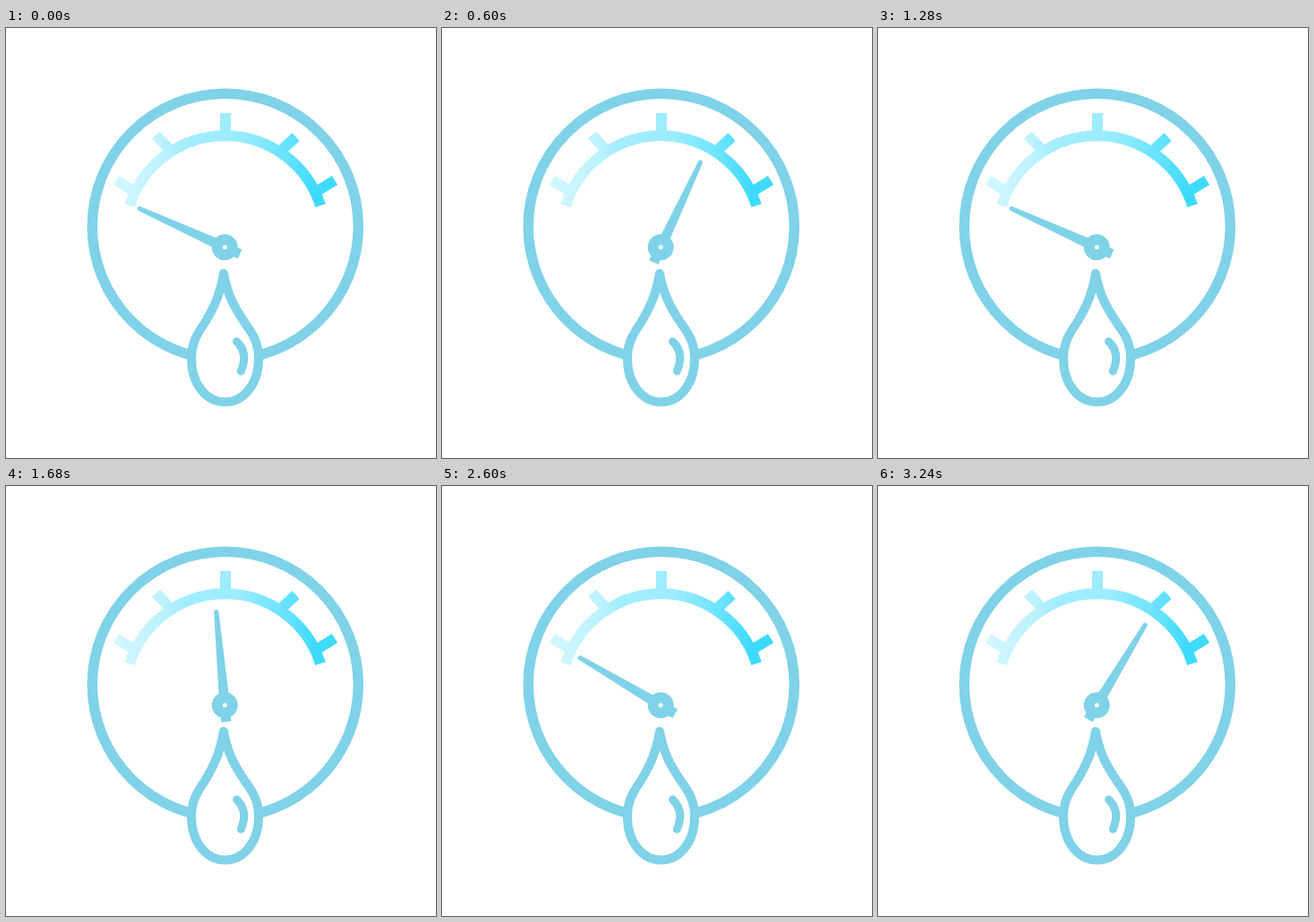
Recreate the animation shown at these times as an HTML page. Size 480 by 480 pixels, loop 3520 ms.

```html
<!DOCTYPE html>
<html lang="en">
<head>
<meta charset="utf-8">
<title>Water gauge</title>
<style>
  html, body { margin: 0; width: 100%; height: 100%; overflow: hidden; background: #fff; }
  svg { display: block; width: 100%; height: 100%; }
</style>
</head>
<body>
<svg viewBox="0 0 480 480" fill="none" stroke="#7fd2e8">
  <defs>
    <linearGradient id="scale" gradientUnits="userSpaceOnUse" x1="120" y1="0" x2="370" y2="0">
      <stop offset="0" stop-color="#d4f7ff"/>
      <stop offset=".22" stop-color="#bcf2ff"/>
      <stop offset=".32" stop-color="#a2edff"/>
      <stop offset=".56" stop-color="#9cecff"/>
      <stop offset=".78" stop-color="#66e2ff"/>
      <stop offset=".9" stop-color="#3edafd"/>
      <stop offset="1" stop-color="#3edafd"/>
    </linearGradient>
  </defs>
  <circle cx="244.8" cy="221.7" r="148.5" stroke-width="11.5"/>
  <path stroke="url(#scale)" stroke-width="12"
    d="M138 198.3A111.7 111.7 0 0 1 351 198.3M123 170L141 181M167.5 119.5L181 134M245 95V119M323.5 121.5L309 135M367 170L349 181"/>
  <g id="needle" fill="#7fd2e8" stroke="none">
    <path d="M-2.6 -104.5A2.6 2.6 0 0 1 2.6 -104.5L5.6 -10V18.5H-5.6V-10Z"/>
  </g>
  <circle cx="244.2" cy="244.8" r="8.5" fill="#fff" stroke-width="12"/>
  <path fill="#fff" stroke-width="10" stroke-linejoin="round"
    d="M243 274C239 296 234 309 222 329C213 342 207 352 207 369C207 398 224 417.5 244.5 417.5C265 417.5 282 398 282 369C282 352 276 342 266.5 329C253 309 247 296 243 274Z"/>
  <path stroke-width="9" stroke-linecap="round" d="M257.5 350Q271 363 262.3 383"/>
</svg>
<script>
  const LOOP = 3520, STEP = 40, SWEEP = 16, LAST = 80;
  const LOW = -65.6, DEGREES_PER_STEP = 6.04;
  const needle = document.getElementById('needle');

  // The needle swings evenly between its stops, then rests at the upper one.
  function render(ms) {
    const step = Math.min(Math.floor((ms % LOOP) / STEP), LAST);
    const swing = SWEEP - Math.abs(SWEEP - step % (2 * SWEEP));
    const angle = LOW + swing * DEGREES_PER_STEP;
    needle.setAttribute('transform', `translate(244.2 244.8) rotate(${angle})`);
  }

  const start = performance.now();
  function tick() {
    render(performance.now() - start);
    requestAnimationFrame(tick);
  }
  tick();
</script>
</body>
</html>
```
